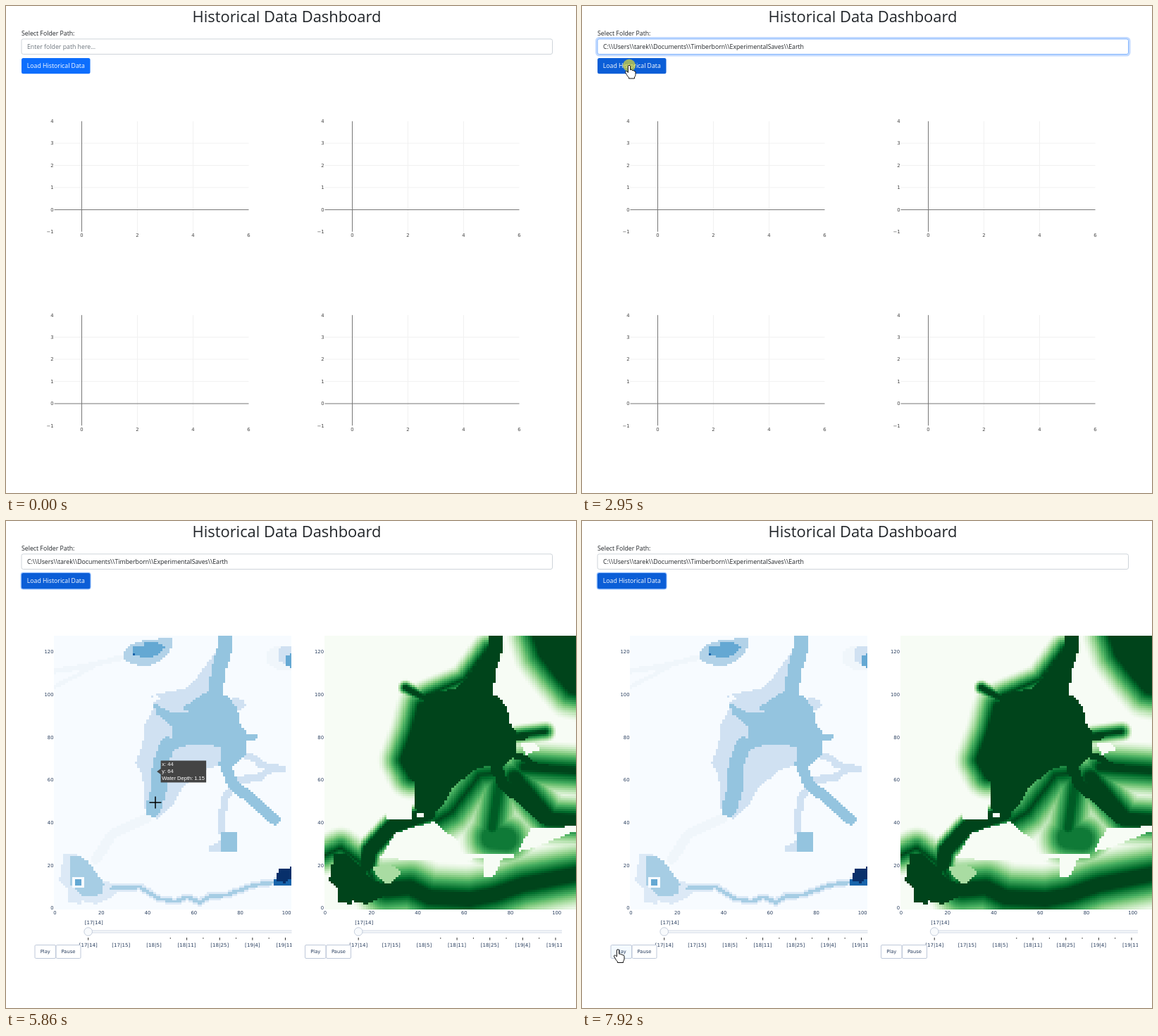
Animation of 809x692 px, one loop 8 s. Source, as an HTML page with a canvas:

```html
<!DOCTYPE html>
<html lang="en">
<head>
<meta charset="utf-8">
<title>Historical Data Dashboard</title>
<style>
html, body { margin: 0; width: 100%; height: 100%; overflow: hidden; background: #fff; }
canvas, svg { position: absolute; left: 0; top: 0; display: block; }
.ui { font: 8.75px "Open Sans", "Noto Sans", sans-serif; fill: #212529; }
.title { font-size: 21.9px; font-weight: 500; }
.plot { font: 6.8px "DejaVu Sans", sans-serif; }
.empty text { fill: #444; }
.loaded text { fill: #2a3f5f; }
.tip { font: 7.5px "Liberation Sans", Arial, sans-serif; fill: #fff; }
</style>
</head>
<body>
<canvas id="heat" width="809" height="692"></canvas>
<svg id="stage" width="809" height="692" viewBox="0 0 809 692"></svg>
<script>
const LOOP = 8000, LOADED = 5170, PASTED = 2400, FOCUS = 1530, CLICK = 2950;
const LEFT = 68, TOP = 163.3, GAP = 383.5, CW = 3.287, CH = 3.033, ROWS = 128;
const stage = document.getElementById("stage");
const heat = document.getElementById("heat");
const $ = id => document.getElementById(id);
const clamp = v => Math.max(0, Math.min(1, v));
const range = n => [...Array(n).keys()];

// ---- geometry ----
const pts = s => s.split(" ").map(p => p.split(",").map(Number));

function inside(poly, x, y) {
  let hit = false;
  poly.forEach(([ax, ay], i) => {
    const [bx, by] = poly[(i + 1) % poly.length];
    if ((ay > y) !== (by > y) && x < (bx - ax) * (y - ay) / (by - ay) + ax) hit = !hit;
  });
  return hit;
}

function distance(line, x, y) {
  let best = 1e9;
  for (let i = 1; i < line.length; i++) {
    const [ax, ay] = line[i - 1], dx = line[i][0] - ax, dy = line[i][1] - ay;
    const k = clamp(((x - ax) * dx + (y - ay) * dy) / (dx * dx + dy * dy || 1));
    best = Math.min(best, Math.hypot(x - ax - k * dx, y - ay - k * dy));
  }
  return best;
}

function paint(x0, x1, colourAt) {
  const g = heat.getContext("2d");
  for (let i = 0; x0 + i * CW < x1; i++) for (let j = 0; j < ROWS; j++) {
    const x = Math.round(x0 + i * CW), y = Math.round(TOP + j * CH);
    const r = Math.min(x1, Math.round(x0 + (i + 1) * CW));
    g.fillStyle = colourAt(x0 + (i + .5) * CW, TOP + (j + .5) * CH);
    g.fillRect(x, y, r - x, Math.round(TOP + (j + 1) * CH) - y);
  }
}

// ---- water depth map ----
const DRY = { colour: "#f7fbff", depth: 0 }, FAINT = { colour: "#f0f6fb", depth: .03 };
const PALE = { colour: "#d0e1f2", depth: .6 }, MID = { colour: "#94c4df", depth: 1.15 };
const POND = { colour: "#b2d2e8", depth: .9 }, DEEP = { colour: "#64a8d3", depth: 1.6 };
const BLUE = { colour: "#1764ab", depth: 2.5 }, NAVY = { colour: "#08306b", depth: 3.2 };
const SHORE = { colour: "#dce9f6", depth: .4 }, BROOK = { colour: "#a6cde4", depth: .95 };
const water = [];

function area(tone, s, soaks) {
  const p = pts(s);
  water.push({ ...tone, soaks, has: (x, y) => inside(p, x, y) });
}
function stream(tone, half, s, soaks) {
  const p = pts(s);
  water.push({ ...tone, soaks, has: (x, y) => distance(p, x, y) < half });
}

stream(FAINT, 4, "68,213 110,207 168,193");
stream(FAINT, 3, "68,236 122,208");
stream(FAINT, 7, "200,422 150,446 128,480");
area(POND, "167,185 176,176 195,170 235,166 235,182 217,200 202,206 178,203 167,196");
area(DEEP, "179,178 195,177 198,171 211,171 227,180 207,195 179,190");
area(BLUE, "179,187 183,187 183,191 179,191");
area(FAINT, "370,184 383,178 405,178 405,212 385,212 370,200");
area(PALE, "387,184 392,179 406,179 406,209 388,199");
area(DEEP, "397,191 406,188 406,209 397,205");
// lake
area(PALE, "301,180 272,221 258,237 207,248 211,262 195,292 195,312 184,344 194,361 197,408 215,424 234,407 251,378 281,354 307,346 312,300", true);
area(DRY, "210,247 218,247 222,254 211,256");
area(PALE, "322,252 335,253 340,262 334,270 322,270");
stream(PALE, 5, "338,333 353,337 362,347 393,353", true);
stream(PALE, 5, "374,354 358,365 328,368");
stream(PALE, 5, "319,362 319,382 309,394 306,440");
stream(MID, 10.5, "311,160 311,180 303,205 297,242", true);
area(MID, "285,243 307,246 319,253 328,268 334,292 342,300 341,333 317,353 304,344 304,322 285,317 262,317 232,327 236,291 214,274 207,257 233,272 255,274 250,266", true);
stream(MID, 4.5, "338,306 354,306", true);
stream(MID, 11, "229,318 219,345 217,382 209,409", true);
stream(MID, 8, "310,345 322,374 345,392 381,424", true);
stream(PALE, 2.2, "218,250 229,259 255,271");
area(PALE, "289,460 302,457 308,440 308,469 289,469");
area(MID, "304,441 325,441 329,448 329,466 322,471 304,470");
// lower pond and brook
area(SHORE, "82,473 101,473 138,511 157,517 158,530 130,545 108,540 106,545 88,541 88,522 75,512", true);
area(BROOK, "91,477 103,475 117,484 139,515 138,529 124,535 109,532 91,516");
area(DRY, "95,506 111,506 111,522 95,522");
area(DEEP, "98,509 108,509 108,518 98,518");
const brook = "150,522 190,520 217,537 240,541 257,535 275,542 290,533 312,532 350,518 382,513";
stream(SHORE, 5.5, brook);
stream(BROOK, 2.6, brook);
area(BLUE, "380,510 392,496 406,500 406,519 381,519");
area(NAVY, "384,502 389,494 406,492 406,508 395,514 385,512");

const waterAt = (x, y) => water.findLast(w => w.has(x, y)) || DRY;

// ---- soil moisture map: value falls with distance from wet ground ----
const greens = "f7fcf5 e5f5e0 c7e9c0 a1d99b 74c476 41ab5d 238b45 006d2c 00441b".split(" ")
  .map(h => [0, 2, 4].map(k => parseInt(h.substr(k, 2), 16)));
function green(v) {
  const p = clamp(v) * 8, i = Math.min(7, Math.floor(p));
  return `rgb(${greens[i].map((c, k) => Math.round(c + (greens[i + 1][k] - c) * (p - i)))})`;
}
const basin = "748,164 757,190 778,218 800,244 809,246";
const corner = pts(basin + " 809,164");
const fades = [], patches = [];
const fade = (reach, half, peak, s) => fades.push({ reach, half, peak, line: pts(s) });
const patch = (value, s) => patches.push({ value, poly: pts(s) });

fade(24, 0, 1, "684,180 650,225 596,248");
fade(9, 3, 1, "567,237 590,250");
fade(32, 5, 1, "590,264 580,300 565,340 576,360");
fade(38, 0, 1, basin);
fade(14, 2, 1, "727,304 766,299");
fade(36, 4, 1, "735,350 809,355");
fade(30, 0, 1, "452,475 475,464 512,492 522,512");
fade(42, 9, 1, "540,524 573,521 601,535 658,538 693,531 733,517 809,502");
fade(12, 9, 1, "512,488 516,468 548,434 600,416");
fade(42, 0, 1, "700,358 672,361 632,414 612,426");
fade(32, 8, 1, "722,365 772,424 809,426");
fade(36, 4, .93, "702,362 690,436");
fade(34, 14, .82, "690,450 710,452");

patch(0, "530,480 552,445 578,435 607,428 641,455 641,473 722,472 722,478 640,481");
patch(0, "677,474 707,474 700,490 692,505 677,505");
patch(0, "540,402 575,402 577,424 540,424");
patch(0, "584,414 594,414 594,420 584,420");
patch(.35, "518,491 545,487 562,499 543,517 530,508");
patch(0, "729,314 748,314 760,325 738,332");
patch(0, "745,437 809,434 809,441 740,467 726,469");

function moistureAt(x, y) {
  const dry = patches.find(d => inside(d.poly, x, y));
  if (dry) return dry.value;
  if (inside(corner, x, y) || water.some(w => w.soaks && w.has(x - GAP, y))) return 1;
  return Math.max(0, ...fades.map(f =>
    f.peak * Math.min(1, 1 - (distance(f.line, x, y) - f.half) / f.reach)));
}

paint(LEFT, 405, (x, y) => waterAt(x, y).colour);
paint(LEFT + GAP, 809, (x, y) => green(moistureAt(x, y)));

// ---- page ----
const text = (x, y, s, anchor = "middle", more = "") =>
  `<text x="${x}" y="${y}" text-anchor="${anchor}" ${more}>${s}</text>`;
const rect = (x, y, w, h, more) => `<rect x="${x}" y="${y}" width="${w}" height="${h}" ${more}/>`;
const line = (x1, y1, x2, y2, c, w = 1) =>
  `<path d="M${x1} ${y1}L${x2} ${y2}" stroke="${c}" stroke-width="${w}"/>`;

function emptyPlot(x, y) {
  const col = n => 107.5 + 39.5 * n, row = n => 289.3 - 31.4 * n;
  return `<g transform="translate(${x} ${y})">` +
    [1, 2, 3].map(n => line(68.5, row(n), 344.5, row(n), "#f1f1f1")).join("") +
    [2, 4].map(n => line(col(n), 163.7, col(n), 320.7, "#f1f1f1")).join("") +
    line(68.5, 289.5, 344.5, 289.5, "#777") + line(107.5, 163.7, 107.5, 320.7, "#777") +
    range(6).map(n => text(67.5, row(n - 1) + 2.3, n ? n - 1 : "−1", "end")).join("") +
    range(4).map(n => text(col(2 * n), 328, 2 * n)).join("") + "</g>";
}

function loadedPlot(x, id) {
  const edge = "#bec8d9";
  const dates = ["[17|14]", "[17|15]", "[18|5]", "[18|11]", "[18|25]", "[19|4]", "[19|11]"];
  const mark = n => 116.7 + 46.63 * n;
  const button = (bx, w, s) =>
    rect(bx, 602.5, w, 19, `rx="1.5" fill="#fff" stroke="${edge}" id="${id + s}"`) +
    text(bx + w / 2, 614.3, s);
  return `<g transform="translate(${x} 0)">` +
    range(7).map(n => text(67.5, 552.4 - 20 * n * CH, 20 * n, "end")).join("") +
    range(6).map(n => text(69.5 + 20 * n * CW, 559.2, 20 * n)).join("") +
    text(124.7, 572.7, "[17|14]", "middle", 'font-size="7.1"') +
    `<g clip-path="url(#cut)">` +
    rect(113, 582, 420, 3, `fill="#f8fafc" stroke="${edge}" stroke-width=".7"`) +
    [0, 3, 4, 5, 6].map(n => line(mark(n), 592, mark(n), 595.6, "#333")).join("") +
    range(5).map(n => line(mark(n + 2.5), 592, mark(n + 2.5), 593.6, "#333")).join("") +
    dates.map((s, n) => text(mark(n), 605.3, s, "middle", 'font-size="7.1"')).join("") +
    `</g><circle cx="116.7" cy="583.5" r="5.8" fill="#f8fafc" stroke="${edge}" stroke-width=".9"/>` +
    button(41, 29.5, "Play") + button(71, 35, "Pause") + "</g>";
}

const path = ["C:", "Users", "tarek", "Documents", "Timberborn", "ExperimentalSaves", "Earth"].join("\\\\");
stage.innerHTML =
  `<defs><clipPath id="cut">${rect(68, 560, 337.5, 60, "")}</clipPath></defs>
  <g class="ui">
    ${text(398.5, 22.5, "Historical Data Dashboard", "middle", 'class="title"')}
    ${text(22, 42, "Select Folder Path:", "start")}
    ${rect(20.5, 45.5, 756.5, 24.5, 'rx="4" fill="none" stroke="#0d6efd" stroke-opacity=".25" stroke-width="3" id="inputRing"')}
    ${rect(22, 46.9, 753.5, 21.6, 'rx="2.5" fill="#fff" stroke="#ced4da" id="input"')}
    ${text(30, 60.6, "", "start", 'id="value"')}
    <path id="caret" d="M30.5 51.5V63.5" stroke="#000"/>
    ${rect(20.6, 72.8, 100, 24.6, 'rx="4" fill="#98c1fe" id="buttonRing"')}
    ${rect(22, 74, 97.5, 22.2, 'rx="2.5" id="button"')}
    ${text(70.8, 88.2, "Load Historical Data", "middle", 'fill="#fff"')}
  </g>
  <g class="plot empty" id="empty">${[0, 275.5].map(y => [0, 384].map(x => emptyPlot(x, y)).join("")).join("")}</g>
  <g class="plot loaded" id="loaded">${loadedPlot(0, "a") + loadedPlot(GAP, "b")}</g>
  <g class="tip" id="tip"><path d="M0 0L5.5 -4V-15.5H70V15.5H5.5V4Z" fill="#444"/>
    ${range(3).map(i => text(7.2, 10 * i - 7.4, "", "start", `id="tip${i}"`)).join("")}</g>
  <circle id="press" r="9" fill="#ebe128"/>
  <g id="cursor" stroke="#111">
    <path id="arrow" d="M0 0V14.5L3.3 11.4L5.5 16.2L7.8 15.2L5.7 10.5H10Z" fill="#fff" stroke-width=".9"/>
    <path id="hand" d="M-1.6 1.3a1.6 1.5 0 0 1 3.2 0V6.2q2.4-.8 2.7.8q2.3-.5 2.5.9q2.2-.2 2.2 1.6V13q0 2.2-1.5 3.6V18.5H-.6V17q-2-1.6-3-4L-5.4 10q-.6-1.8 1-2q1.2 0 2.8 2Z" fill="#fff"/>
    <path id="beam" d="M-3 -6.5H3M0 -6V6M-3 6.5H3" stroke-width="1.1"/>
    <path id="cross" d="M-8.5 0H8.5M0 -8.5V8.5" stroke="#000" stroke-width="1.5"/>
  </g>`;

// ---- motion: time, x, y ----
const track = pts("320,706,646 800,104,69 1120,104,69 1260,104,62.5 1600,104,62.5 1900,107,158 2300,98,62 2400,98,62 2750,67,84.5 3020,67,84.5 3360,76,84.5 4900,76,84.5 5440,189,145 5650,214,223 5720,214,223 5860,212,400 6270,212,400 6620,195.5,469 6700,193,474 7040,212,441 7110,212,441 7860,51,607 7920,51,609");

function pointer(t) {
  const n = track.findIndex(k => k[0] > t);
  if (n < 0) return track.at(-1).slice(1);
  if (n === 0) return track[0].slice(1);
  const [a, ax, ay] = track[n - 1], [b, bx, by] = track[n], k = (t - a) / (b - a);
  return [ax + (bx - ax) * k, ay + (by - ay) * k];
}

const within = ([x, y], l, t, r, b) => x >= l && x <= r && y >= t && y <= b;
const onButton = p => within(p, 22, 74, 119.5, 96);
const onPlay = p => within(p, 41, 602, 70.5, 622);
const onPause = p => within(p, 71, 602, 106, 622);
const onPlot = (p, loaded) => loaded
  ? within(p, 68, 163, 405, 551)
  : [0, 384].some(x => [0, 275.5].some(y => within(p, 69 + x, 164 + y, 345 + x, 320 + y)));

function shape(p, loaded) {
  if (within(p, 22, 46, 776, 70)) return "beam";
  if (onButton(p) || loaded && (onPlay(p) || onPause(p))) return "hand";
  return onPlot(p, loaded) ? "cross" : "arrow";
}

const show = (id, on) => { $(id).style.display = on ? "" : "none"; };
const set = (id, attrs) => { for (const k in attrs) $(id).setAttribute(k, attrs[k]); };

function drawTip(t, loaded, p) {
  const late = pointer(t - 35);
  const on = loaded && onPlot(p, true) && onPlot(late, true);
  show("tip", on);
  if (!on) return;
  const x = Math.round((late[0] - 69.5) / CW), y = Math.round((550 - late[1]) / CH);
  const px = 69.5 + x * CW, py = 550 - y * CH;
  set("tip", { transform: `translate(${px} ${py})` });
  $("tip0").textContent = "x: " + x;
  $("tip1").textContent = "y: " + y;
  $("tip2").textContent = "Water Depth: " + waterAt(px, py).depth.toFixed(2);
}

function draw(t) {
  const loaded = t >= LOADED, p = pointer(t), kind = shape(p, loaded);
  const released = clamp((t - CLICK - 70) / 150);
  const focus = clamp((t - FOCUS) / 150) * (1 - released);

  show("heat", loaded);
  show("loaded", loaded);
  show("empty", !loaded);

  set("inputRing", { opacity: focus });
  set("input", { stroke: focus > .5 ? "#86b7fe" : "#ced4da" });
  $("value").textContent = t < PASTED ? "Enter folder path here..." : path;
  set("value", { fill: t < PASTED ? "#6c757d" : "#212529" });
  show("caret", t >= FOCUS && t < FOCUS + 530);
  set("buttonRing", { opacity: released });
  set("button", { fill: onButton(p) || released > 0 ? "#0b5ed7" : "#0d6efd" });
  set("aPlay", { fill: loaded && onPlay(p) ? "#f4faff" : "#fff" });
  set("aPause", { fill: loaded && onPause(p) ? "#f4faff" : "#fff" });

  const since = t >= CLICK ? t - CLICK : t - FOCUS;
  show("press", since >= 0 && since < 210);
  set("press", { cx: p[0], cy: p[1], opacity: .65 * clamp((210 - since) / 100) });

  show("cursor", t >= track[0][0]);
  set("cursor", { transform: `translate(${p})` });
  for (const id of ["arrow", "hand", "beam", "cross"]) show(id, id === kind);
  drawTip(t, loaded, p);
}

const start = performance.now();
function tick() {
  draw((performance.now() - start) % LOOP);
  requestAnimationFrame(tick);
}
tick();
</script>
</body>
</html>
```
